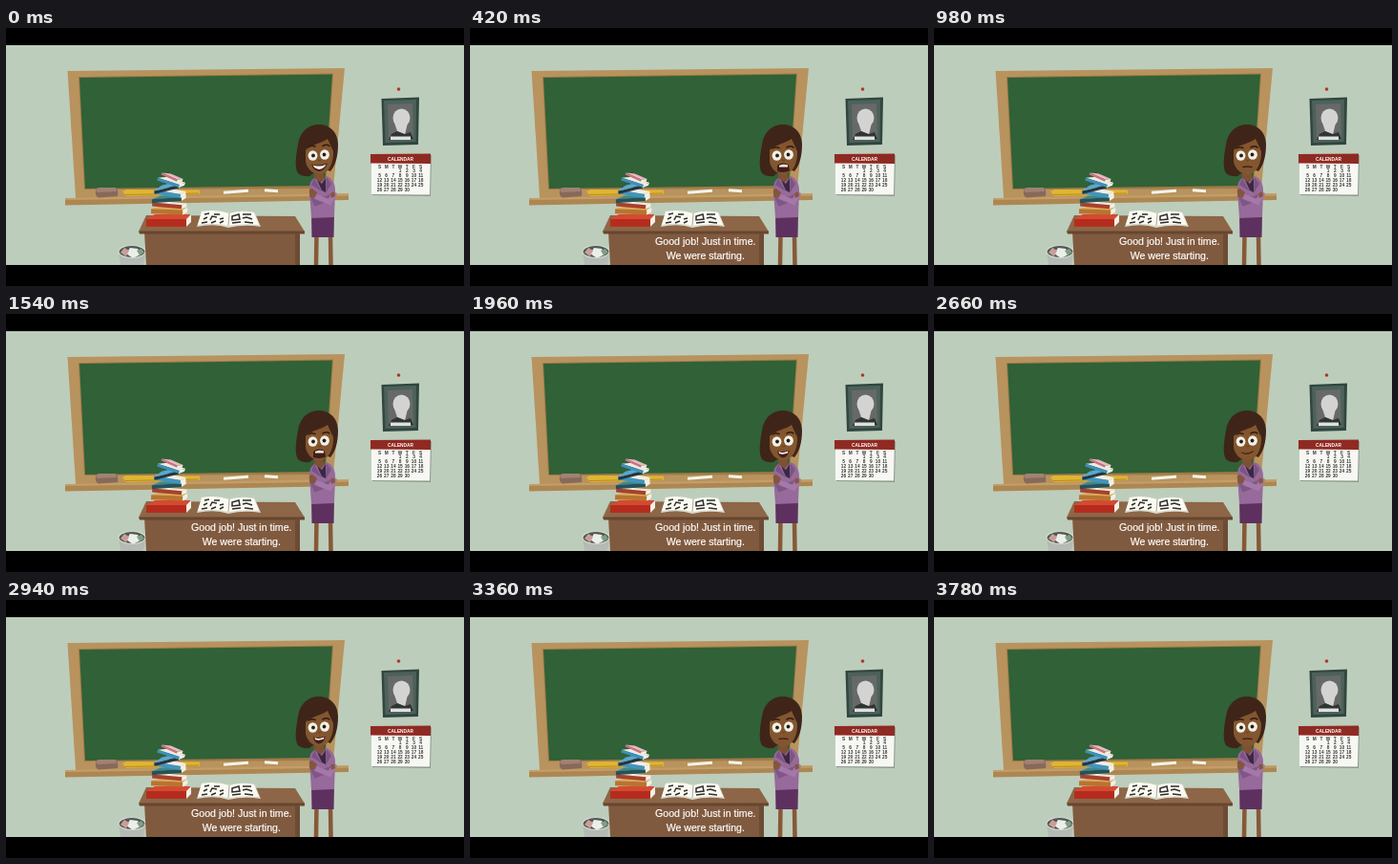
Write an HTML page that moves like this. It is 480x270 px and loops after 3.92 s.

```html
<!DOCTYPE html>
<html lang="en">
<meta charset="utf-8">
<title>Classroom</title>
<style>
html, body { margin: 0; width: 100%; height: 100%; overflow: hidden; background: #000 }
svg { display: block; width: 480px; height: 270px }
text { font-family: "Liberation Sans", Arial, sans-serif; text-anchor: middle }
</style>
<svg viewBox="0 0 480 270">
  <defs><clipPath id="stage"><path d="M0 18H480V248H0z"/></clipPath></defs>
  <g clip-path="url(#stage)">
    <path fill="#bdcdbb" d="M0 18H480V248H0z"/>

    <g id="board">
      <path fill="#b8935e" d="M64.500 45 355 42 342 178 73 178z"/>
      <path fill="#a17a48" d="M76 51 343 47.500 335 168 82 169z"/>
      <path fill="#306137" d="M77 52 342 48.500 334 165 83 168z"/>
      <path fill="#c49d67" d="M62 178 359 173V176L62 181z"/>
      <path fill="#ad8752" d="M62 180 359 175.500V180L62 185.500z"/>
      <path fill="#87695a" d="M94 170Q94 167 98 167L115 167Q118 169 117 176L97 177.500Q93 176 94 170z"/>
      <path fill="#a18172" d="M94 170Q95 167 99 167L115 167 116 171 96 172z"/>
      <path fill="#dfb532" d="M122 171 126 169 203 169.500V174L126 176z"/>
      <path stroke="#b88a24" d="M125 174.500 202 173"/>
      <path stroke="#f3f3ea" stroke-width="3" d="M228 172.300 254 170.300M271 169.800 285 170.800"/>
    </g>

    <g id="portrait">
      <circle cx="411.500" cy="64" r="1.800" fill="#a63a2d"/>
      <path fill="#30463f" d="M393.500 74 433 72.500 432 122 395 123z"/>
      <path fill="#4c625a" d="M396 76 430 75 429.500 119 397.500 120z"/>
      <path fill="#666968" d="M400 80 426 79 427 116 401 117z"/>
      <ellipse cx="414.500" cy="94" rx="9" ry="9.500" fill="#d3d4d1"/>
      <path fill="#d3d4d1" d="M406 96 421 99 418 112 410 108z"/>
      <path fill="#303533" d="M401 117 404 111 410 108 418 111 424 109 427 116z"/>
      <path fill="#dfe1dd" d="M403 113.500H424V117H403z"/>
    </g>

    <g id="calendar">
      <path fill="#8c9889" d="M383 134 446 133 445 176 384 175z"/>
      <path fill="#f7f7f3" d="M383 133H445L444 174.500 383 174z"/>
      <path fill="#8f2a23" d="M382 132 445 131.500V142L382 141.500z"/>
      <text x="413.500" y="139" font-size="4.800" font-weight="700" fill="#fff">CALENDAR</text>
    </g>

    <g id="bin">
      <path fill="#b4bbb5" d="M118 234H146L143 255H121z"/>
      <ellipse cx="132" cy="234" rx="14" ry="6.500" fill="#515753"/>
      <path fill="#eceee8" d="M126 236 130 230 138 231 141 237 133 241z"/>
      <path fill="#c99f98" d="M120 235 124 230 129 233 126 239z"/>
      <path fill="#7ba184" d="M137 233 142 231 145 235 140 238z"/>
      <ellipse cx="132" cy="234" rx="14" ry="6.500" fill="none" stroke="#d2d8d1" stroke-width="1.200"/>
    </g>

    <g id="teacher">
      <path fill="none" stroke="#875837" stroke-width="4.500" d="M325.500 216 325 248M340 216 340.500 248"/>
      <path fill="#5d3060" d="M320 194H344L343.500 219H320.500z"/>
      <path fill="#3f2519" d="M306 152C302 146 304 133 306 122 308 108 317 101 328 101 340 101 348 110 348 122 348 135 345 144 340 150L330 146 318 155Q311 156 306 152z"/>
      <path fill="#7d5133" d="M323 148H332L334 162 329 167 323 160z"/>
      <path fill="#966a9a" d="M323 157 330 162 336 155C342 157 345 163 345 170L344 198 320 199 318 169Q318 160 323 157z"/>
      <path fill="#3b2744" d="M326 159 331 163 335 157 335 172 331 170z"/>
      <path fill="#7c5482" d="M323 157 331 171 320 164zM336 156 341 163 335 173z"/>
      <path fill="none" stroke="#7f5785" stroke-width="6" stroke-linecap="round" d="M321 175 325 183 340 177"/>
      <path fill="none" stroke="#a479a7" stroke-width="5.500" stroke-linecap="round" d="M344 174 339 182 326 177"/>
      <path fill="#85563a" d="M318 172Q317 168 321 168L326 172 324 177 319 177zM340 173 344 171 345 176 341 178z"/>
      <path fill="#83562f" d="M313 131C314 117 320 112 329 112 339 113 344 120 343 133 342 146 336 153 328 153 318 152 313 144 313 131z"/>
      <path fill="#3f2519" d="M306 130C306 112 317 104 330 105 342 106 347 116 344 131 341 125 339 120 337 116 328 122 319 122 314 128L314 148Q304 144 306 130z"/>
      <g id="brows" fill="none" stroke="#321a13" stroke-width="1.500" stroke-linecap="round"/>
      <g fill="#f2f0e6">
        <ellipse cx="321.500" cy="133.500" rx="4.900" ry="5.200"/>
        <ellipse cx="334" cy="132.500" rx="4.900" ry="5.200"/>
      </g>
      <g fill="#24201d"><circle cx="322" cy="133.500" r="1.900"/><circle cx="333.500" cy="132.500" r="1.900"/></g>
      <path fill="none" stroke="#673d29" d="M327 138q2 2 3 0"/>
      <g id="mouth"/>
    </g>

    <g id="desk">
      <path fill="#805a3f" d="M145 213H308V248H147z"/>
      <path fill="#8d6647" d="M147 196 303 197 313 213H139z"/>
      <path fill="#674630" d="M139 212.500H313V215.500H140z"/>
      <path fill="#6d4b35" d="M303 215.500H308V248H303z"/>
      <path fill="#d9d9cf" d="M200 208Q219 204 233 209 250 205 267 208L261 194Q247 191 234 195 220 190 205 193z"/>
      <path fill="#fbfaf1" d="M201 206Q219 203 233 207 250 204 265 206L260 193Q247 190 234 194 220 189 205 192z"/>
      <path fill="none" stroke="#aaa99f" d="M234 194 233 207"/>
      <g fill="none" stroke="#2d2e2b" stroke-width="1.500">
        <path d="M208 195l5-1m5 1 6 0M207 200l4-2m3 3 2-4 5 1m3 2 4-1M205 204l6-1m4 1 5-2m4 2 4-2"/>
        <path d="M237 197l7-2 1 5-8 1zm11-2 9 0m-9 4 4-1 6 2M237 204l9-1m4 0 9 1"/>
      </g>
    </g>
    <g id="books"/>
  </g>
  <g id="caption" fill="#fff" stroke="#fff" stroke-width=".2" font-size="10.6">
    <text x="246.800" y="227">Good job! Just in time.</text>
    <text x="246.800" y="241.500">We were starting.</text>
  </g>
</svg>
<script>
const $ = id => document.getElementById(id);

// Calendar: a thirty-day month starting on Wednesday.
const cell = (s, col, row) =>
  `<text x="${391.5 + col * 7.2}" y="${146.5 + row * 4.9}" font-size="4.8" font-weight="700" fill="#383a37">${s}</text>`;
let days = [..."SMTWTFS"].map((s, i) => cell(s, i, 0)).join("");
for (let d = 1; d <= 30; d++) days += cell(d, (d + 2) % 7, 1 + Math.floor((d + 2) / 7));
$("calendar").innerHTML += days;

// Each book: middle of its front edge, width, depth, thickness, tilt, cover and spine colours.
const book = ([x, y, w, depth, h, tilt, cover, spine]) => {
  const a = w / 2, b = a - 5;
  return `<g transform="translate(${x} ${y}) rotate(${tilt})">
    <path fill="${cover}" d="M${-a} ${-h}L${-a + 9} ${-h - depth}H${a}L${b} ${-h}z"/>
    <path fill="#f3f0e6" d="M${b} ${-h}L${a} ${-h - depth}V${-depth}L${b} 0z"/>
    <path fill="${spine}" d="M${-a} ${-h}H${b}V0H${-a}z"/>
  </g>`;
};
$("books").innerHTML = [
  [170.5, 208, 47, 5, 8, 0, "#d44a30", "#b52c1e"],
  [171, 195, 38, 3, 5, 2, "#dfa95a", "#b8742f"],
  [171, 188, 36, 2, 4, 5, "#f0ead9", "#a8402c"],
  [171, 182, 36, 3, 4, -4, "#3b8a8c", "#24535c"],
  [171, 176, 33, 4, 4, 10, "#f0eee8", "#3f95c0"],
  [171, 170, 31, 4, 3, -14, "#57a9d0", "#27353f"],
  [172, 164, 29, 4, 3, 18, "#eeeae0", "#3d8fbb"],
  [173, 158, 23, 3, 2, 24, "#e9b9bd", "#cf7386"]
].map(book).join("");

const line = d => `<path fill="none" stroke="#43231b" stroke-width="1.4" stroke-linecap="round" d="${d}"/>`;
const open = (lips, teeth) => `<path fill="#421d18" d="${lips}"/><path fill="#f8f4e9" d="${teeth}"/>`;
const mouths = {
  flat: line("M324 145.500Q328 144.500 333 145.500"),
  smile: line("M323 145Q328 148 334 144"),
  grin: open("M320 142.500Q328 145 337 141.500 334 149.500 328 150 322 149 320 142.500z",
    "M321.500 143.500Q328 146 335.500 142.700 333 147.500 328 148 323 147 321.500 143.500z"),
  wide: open("M322 144Q328 139.500 334 143.500L335 149.500Q329 152 322 150z", "M324 144Q328 142 333 143.500V145.500H324z"),
  talk: open("M322 143.500Q328 145 335 142.500 333 150 328 150.500 323 149.500 322 143.500z",
    "M323.500 144Q328 146 333.500 143.500L333 145.500Q328 147.500 324 146z")
};
const speech = ("grin grin talk wide talk smile talk flat talk smile talk wide talk smile " +
  "talk talk smile smile talk smile talk talk smile smile flat flat flat flat").split(" ");
const STEP = 140, LOOP = 3920, CAPTION_ON = 280, CAPTION_OFF = 3500;
let last = -1;

function draw(now) {
  const time = now % LOOP, step = Math.floor(time / STEP);
  if (step !== last) {
    const shape = speech[step], lift = shape === "grin" ? -1.5 : 0;
    $("mouth").innerHTML = mouths[shape];
    $("brows").innerHTML = `<path transform="translate(0 ${lift})" d="M317 126Q320 124 324 125.500M332 125Q336 122.500 339 125"/>`;
    $("caption").style.display = time >= CAPTION_ON && time < CAPTION_OFF ? "" : "none";
    last = step;
  }
  requestAnimationFrame(draw);
}
draw(performance.now());
</script>
</html>
```
